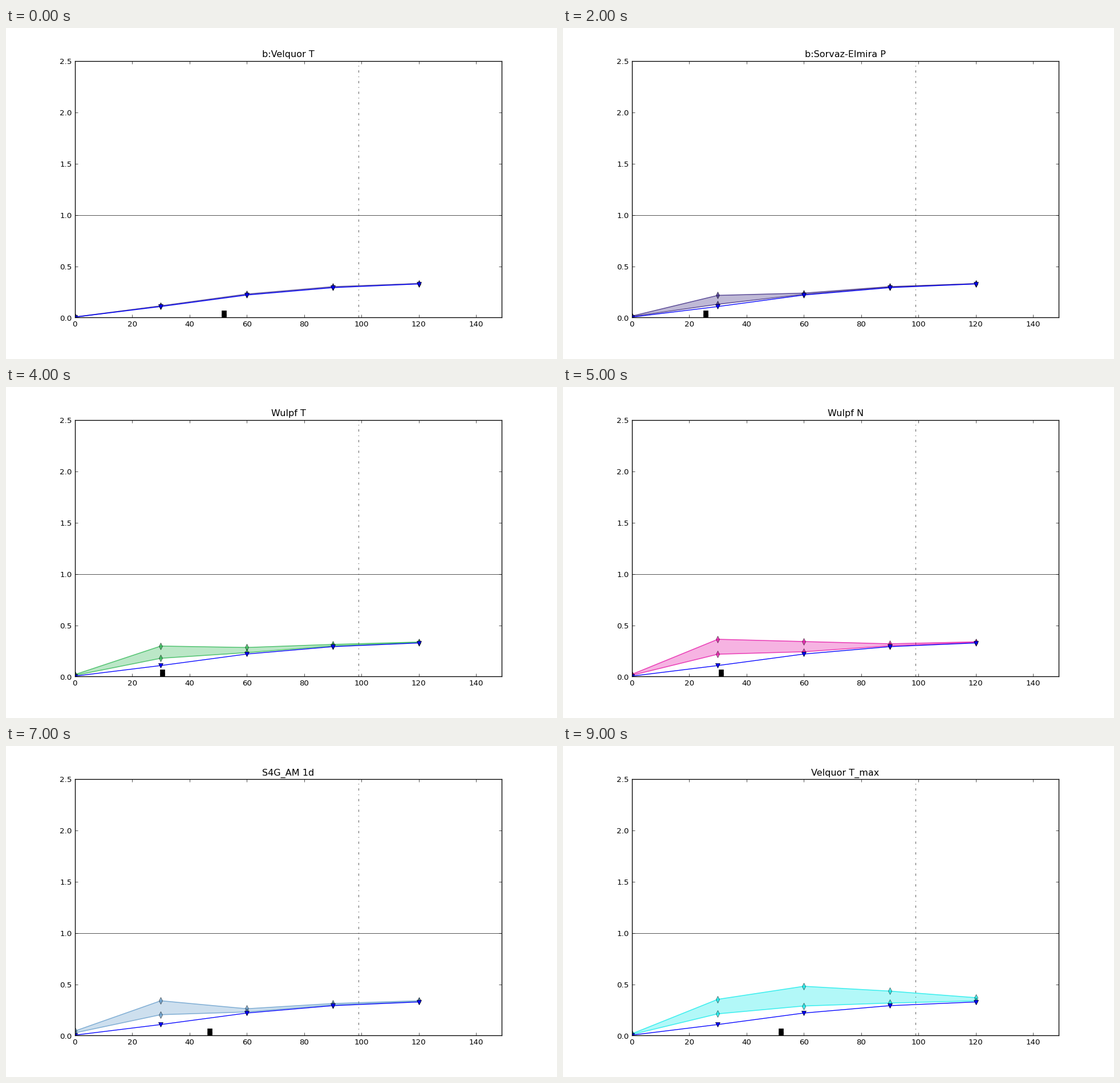
Write a matplotlib script that moves like this. It is 966 px wide and 580 px high and loops after 10 s.

```python
import matplotlib.pyplot as plt
import numpy as np
from matplotlib.animation import FuncAnimation

W, H, DPI = 966, 580, 96

plt.rcParams.update({
    "font.family": "DejaVu Sans", "font.size": 10,
    "axes.linewidth": 1, "axes.titlesize": 12, "axes.titlepad": 5,
    "lines.scale_dashes": False, "lines.markeredgewidth": 0.5,
    "xtick.direction": "in", "ytick.direction": "in",
    "xtick.top": True, "ytick.right": True,
    "xtick.major.size": 4, "ytick.major.size": 4,
    "xtick.major.width": 0.5, "ytick.major.width": 0.5,
    "xtick.major.pad": 4, "ytick.major.pad": 4,
})

X = np.arange(0, 121, 30)
BASE = np.array([0.005, 0.108, 0.220, 0.292, 0.328])

# title, band colour, box positions, upper edge of the band
STEPS = [
    ("b:Velquor T", "#463c96", [52], [.006, .115, .230, .302, .332]),
    ("b:Wulpf D", "#b0783c", [26], [.010, .160, .235, .302, .331]),
    ("b:Sorvaz-Elmira P", "#2d197a", [25.7], [.015, .217, .239, .302, .331]),
    ("Wulpf D", "#c8a03c", [26], [.017, .255, .262, .309, .334]),
    ("Wulpf T", "#20b248", [30.5], [.020, .298, .284, .314, .337]),
    ("Wulpf N", "#e405a2", [31.1], [.022, .364, .342, .320, .339]),
    ("Wulpf R", "#76dab6", [26], [.028, .348, .281, .309, .332]),
    ("S4G_AM 1d", "#5a96c8", [47], [.045, .340, .262, .313, .340]),
    ("S4G_AM 2d", "#6252cd", [11.7, 47], [.068, .348, .252, .315, .341]),
    ("Velquor T_max", "#00eaea", [52], [.018, .354, .481, .434, .370]),
]


def lower_edge(upper):
    near_base = BASE + 0.004 + 0.15 * (upper - BASE)
    return np.minimum(upper, np.maximum(0.6 * upper, near_base))


fig = plt.figure(figsize=((W + 0.001) / DPI, (H + 0.001) / DPI), dpi=DPI,
                 facecolor="white")
ax = fig.add_axes([0.125, 0.125, 0.775, 0.775])
ax.set_xlim(0, 149)
ax.set_ylim(0, 2.5)
ax.set_xticks(range(0, 141, 20))
ax.set_yticks(np.arange(0, 2.6, 0.5))
title = ax.set_title("", y=1.0)

ax.axhline(1, color="k", lw=0.5)
ax.axvline(99, color="k", lw=0.5, ls=(0, (3, 5, 1, 5)))

band, = ax.fill([0, 1, 1], [0, 0, 1], alpha=0.3, lw=0, zorder=1)
edges = [ax.plot([], [], "-d", lw=1.2, ms=6, mec="k", alpha=0.7)[0]
         for _ in range(2)]
boxes, = ax.plot([], [], "s", color="k", ms=6, mec="k")
ax.plot(X, BASE, "-v", color="blue", lw=1, ms=6, mec="k")


def draw(i):
    name, color, spots, top = STEPS[i]
    upper = np.array(top)
    lower = lower_edge(upper)
    title.set_text(name)
    band.set_xy(np.column_stack([np.r_[X, X[::-1]],
                                 np.r_[upper, lower[::-1]]]))
    band.set_facecolor(color)
    for line, y in zip(edges, (upper, lower)):
        line.set_data(X, y)
        line.set_color(color)
        line.set_markerfacecolor(color)
    boxes.set_data(np.repeat(spots, 2), [0.01, 0.05] * len(spots))
    return [title, band, boxes, *edges]


anim = FuncAnimation(fig, draw, frames=len(STEPS), interval=1000,
                     init_func=lambda: draw(0), repeat=True, repeat_delay=0)
plt.show()
```
